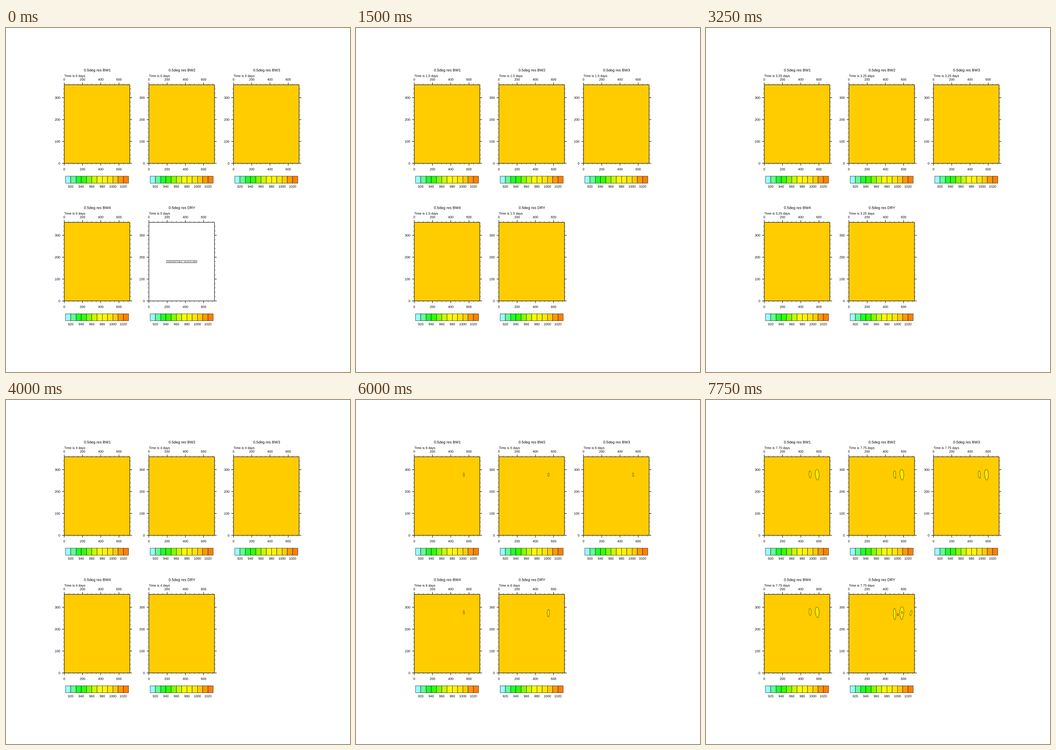
These frames come from a looping animation (748x748 px, 8 s). A matplotlib script:

```python
import matplotlib.pyplot as plt
import numpy as np
from matplotlib.animation import FuncAnimation
from matplotlib.patches import PathPatch, Polygon, Rectangle
from matplotlib.path import Path
from matplotlib.textpath import TextPath

SIZE, DPI = 748, 64
PT = 72 / DPI                       # points per pixel
FRAMES, INTERVAL = 32, 250
STEP = 0.25                         # days per frame
LAST = (FRAMES - 1) * STEP
DRIFT = 4.2                         # pixels per day, eastward

LEFT, BOTTOM = 126.7, 294.3         # lower left corner of the first panel
DX, DY = 184.0, 299.2
WIDTH, HEIGHT = 142.6, 170.9
SX, SY = WIDTH / 719, HEIGHT / 359  # pixels per grid cell

COLORS = ["#96ffff", "#64ff96", "#1eff32", "#32ff00", "#82ff00", "#c8ff00",
          "#ffff00", "#fff500", "#ffe600", "#ffcc00", "#ff9900", "#ff8000"]
BASE, LOW, LOWER, HIGH = COLORS[9], COLORS[8], COLORS[7], COLORS[10]

plt.rcParams["font.family"] = "Liberation Sans"

fig = plt.figure(figsize=(SIZE / DPI, SIZE / DPI), dpi=DPI, facecolor="white")
ax = fig.add_axes([0, 0, 1, 1])
ax.set_xlim(0, SIZE)
ax.set_ylim(SIZE, 0)
ax.axis("off")


def text_path(x, y, text, size, align):
    """Outline of text on baseline y; align is 0 left, 0.5 centre, 1 right."""
    path = TextPath((0, 0), text, size=size)
    box = path.get_extents()
    shift = x - align * (box.x0 + box.x1)
    return Path(path.vertices * [1, -1] + [shift, y], path.codes)


def label(x, y, text, size=7.15, align=0.5):
    patch = PathPatch(text_path(x, y, text, size, align), fc="black", lw=0,
                      snap=False, zorder=5)
    return ax.add_patch(patch)


def line(x0, y0, x1, y1, width):
    ax.plot([x0, x1], [y0, y1], color="black", lw=width * PT, zorder=4,
            solid_capstyle="butt", snap=False)


def box(x, y, w, h, color, width, z):
    patch = Rectangle((x, y), w, h, fc=color, ec="black", lw=width * PT,
                      snap=False, zorder=z)
    return ax.add_patch(patch)


def draw_axes(x0, y0):
    top, right = y0 - HEIGHT, x0 + WIDTH
    for v in range(0, 720, 50):
        x, major = x0 + v * SX, v % 200 == 0
        size, width = (4.8, 0.95) if major else (2.6, 0.5)
        line(x, y0, x, y0 + size, width)
        line(x, top, x, top - size, width)
        if major:
            label(x, top - 9, str(v))
            label(x, y0 + 15.2, str(v))
    for v in range(0, 360, 20):
        y, major = y0 - v * SY, v % 100 == 0
        size, width = (4.8, 0.95) if major else (2.6, 0.5)
        line(x0, y, x0 - size, y, width)
        line(right, y, right + size, y, width)
        if major:
            label(x0 - 8.7, y + 2.6, str(v), align=1)


def draw_colorbar(x0, y0):
    step = 137.2 / len(COLORS)
    for i, color in enumerate(COLORS):
        x = x0 + 2.7 + i * step
        box(x, y0 + 27.8, step, 15.2, color, 0.6, 2)
        if i % 2:
            label(x, y0 + 52.9, str(910 + 10 * i))


class Cell:
    """A closed contour that grows from nothing at `start` and drifts east."""

    def __init__(self, x, y, w, h, start, color=LOW, egg=0.0, lean=0.0, tail=0.0):
        self.x, self.y, self.w, self.h = x, y, w, h
        self.start, self.egg, self.lean, self.tail = start, egg, lean, tail
        self.patch = Polygon([[0, 0]], closed=True, fc=color, ec="#202000",
                             lw=0.6 * PT, zorder=3)
        ax.add_patch(self.patch)

    def update(self, day):
        grow = max(0.0, (day - self.start) / (LAST - self.start)) ** 0.5
        self.patch.set_visible(grow > 0)
        a = np.linspace(0, 2 * np.pi, 90, endpoint=False)
        c, s = np.cos(a), np.sin(a)
        spike = self.tail * np.exp(-((a - 1.05) / 0.2) ** 2)
        x = self.w / 2 * c * (1 - self.egg * s) + self.lean * s + 1.3 * spike
        y = self.h / 2 * s + 1.5 * spike
        cx = self.x - DRIFT * (LAST - day)
        self.patch.set_xy(np.column_stack([cx + grow * x, self.y + grow * y]))


def moist_cells(x0, dy, tail):
    return [
        Cell(x0 + 115.2, 162.5 + dy, 8.4, 23, 5.76, egg=0.12, lean=0.6),
        Cell(x0 + 99.6, 161.8 + dy, 4.7, 15.6, 6.8, egg=0.08, lean=0.2, tail=tail),
    ]


def dry_cells(x0, dy):
    return [
        Cell(x0 + 115, 164.5 + dy, 8.4, 28.4, 5.15, egg=0.25, lean=-0.6),
        Cell(x0 + 99.6, 166.2 + dy, 5.7, 25.4, 6.2, egg=0.15, lean=0.3),
        Cell(x0 + 135, 164.2 + dy, 3.9, 11.4, 7.4, egg=0.1, lean=-1.1),
        Cell(x0 + 115.4, 162.7 + dy, 2.3, 5.6, 7.65, color=LOWER),
        Cell(x0 + 106.6, 167.7 + dy, 1.8, 5.6, 7.65, color=HIGH),
    ]


cells, clocks = [], []
for n, name in enumerate(["BW1", "BW2", "BW3", "BW4", "DRY"]):
    x0, dy = LEFT + DX * (n % 3), DY * (n // 3)
    y0, mid = BOTTOM + dy, LEFT + DX * (n % 3) + WIDTH / 2
    field = box(x0, y0 - HEIGHT, WIDTH, HEIGHT, BASE, 0.95, 2)
    draw_axes(x0, y0)
    draw_colorbar(x0, y0)
    label(mid + 0.6, 94.4 + dy, f"0.5deg res {name}", 8.15)
    clocks.append((x0, 106.5 + dy, label(x0, 106.5 + dy, "0", align=0)))
    if name == "DRY":
        cells += dry_cells(x0, dy)
        dry_field = field
        notice = [box(mid - 33, 505.6, 66, 4.9, "white", 0.6, 4),
                  label(mid, 509.5, "CONSTANT FIELD - VALUE IS 1000", 3.85)]
    else:
        cells += moist_cells(x0, dy, tail=1.0 if name in ("BW2", "BW3") else 0.0)


def update(frame):
    day = frame * STEP
    for x, y, patch in clocks:
        patch.set_path(text_path(x, y, f"Time is {day:g} days", 7.15, 0))
    for cell in cells:
        cell.update(day)
    constant = frame == 0
    dry_field.set_facecolor("white" if constant else BASE)
    for part in notice:
        part.set_visible(constant)
    return []


anim = FuncAnimation(fig, update, frames=FRAMES, interval=INTERVAL,
                     repeat=True, repeat_delay=0, blit=False)
plt.show()
```
